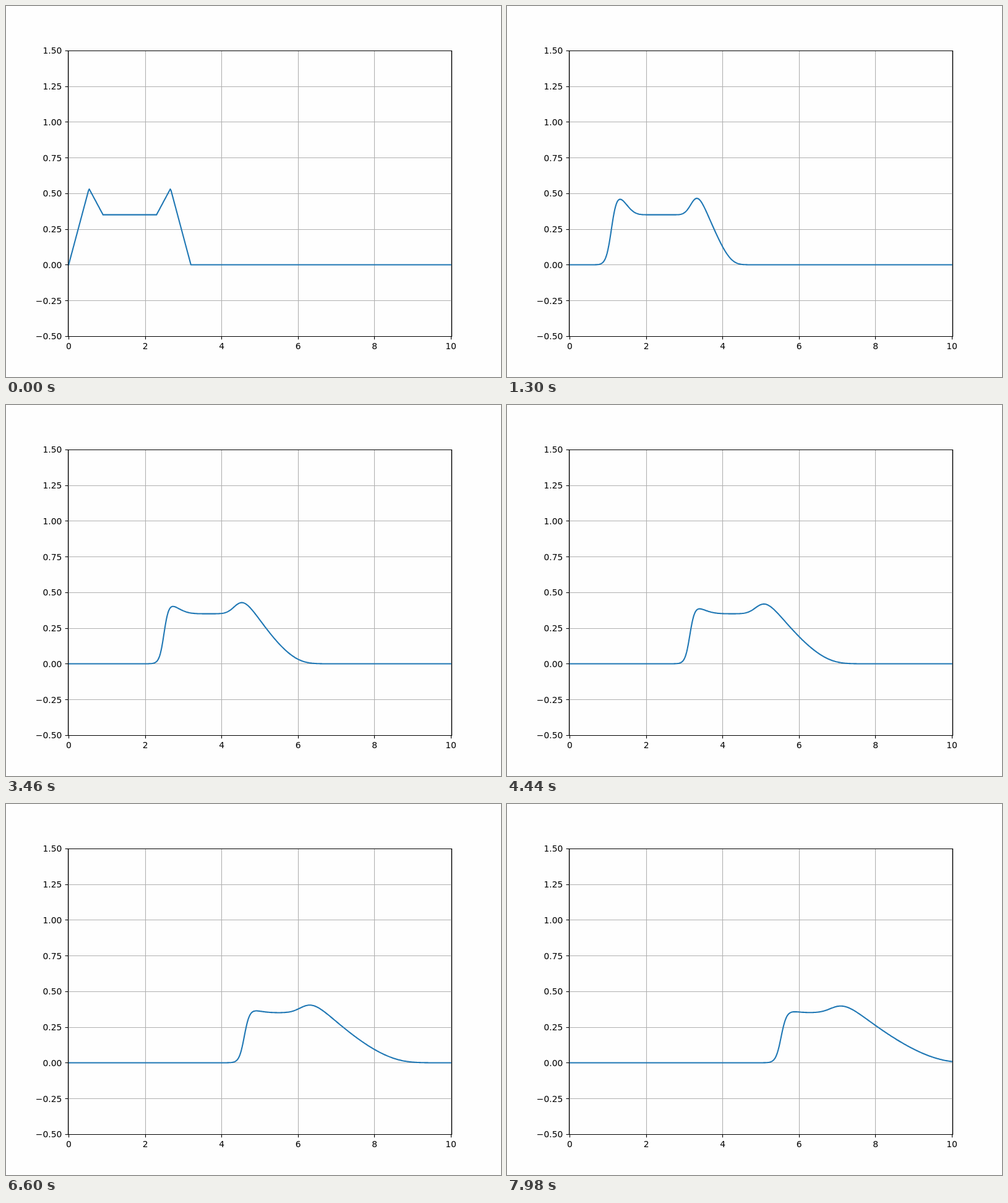
Animation, 800 px wide and 600 px high, one loop 8 s. Source, as an HTML page:

```html
<!DOCTYPE html>
<html lang="en">
<head>
<meta charset="utf-8">
<title>Travelling wave</title>
<style>
  html, body { margin: 0; width: 100%; height: 100%; overflow: hidden; background: #fefefe; }
  svg { display: block; width: 800px; height: 600px; }
  text { font: 13.89px "DejaVu Sans", sans-serif; }
  .line { stroke-width: 1.11; fill: none; }
  .grid { stroke: #b0b0b0; }
  .axis { stroke: #000; }
  #curve { fill: none; stroke: #1f77b4; stroke-width: 2.08; stroke-linejoin: round; stroke-linecap: square; }
</style>
</head>
<body>
<svg viewBox="0 0 800 600">
  <g id="grid"></g>
  <polyline id="curve"/>
  <g id="axes"></g>
</svg>
<script>
const STEP_MS = 20, STEPS = 400;
const DX = 0.02, CELLS = 501;
const SPEED = 0.802, SUBSTEPS = 4;
const BOX = { left: 100, right: 720, top: 72, bottom: 534 };

const px = x => BOX.left + (x + DX) * 620 / (10 + 2 * DX);
const py = y => BOX.top + (1.5 - y) * 231;
const snap = v => Math.floor(v + 0.5) + 0.5;

const gridLayer = document.getElementById('grid');
const axesLayer = document.getElementById('axes');
const curve = document.getElementById('curve');

function add(parent, tag, attrs, text = '') {
  const el = document.createElementNS('http://www.w3.org/2000/svg', tag);
  for (const name in attrs) el.setAttribute(name, attrs[name]);
  el.textContent = text;
  parent.appendChild(el);
}
const path = (parent, kind, d) => add(parent, 'path', { class: 'line ' + kind, d });

function drawAxes() {
  const { left, right, top, bottom } = BOX;
  for (let x = 0; x <= 10; x += 2) {
    const sx = snap(px(x));
    path(gridLayer, 'grid', `M${sx} ${top}V${bottom}`);
    path(axesLayer, 'axis', `M${sx} ${bottom + 0.5}v4.86`);
    add(axesLayer, 'text', { x: px(x) + 0.3, y: 555, 'text-anchor': 'middle' }, String(x));
  }
  for (let i = -2; i <= 6; i++) {
    const y = i / 4, sy = snap(py(y) - 0.01);
    path(gridLayer, 'grid', `M${left} ${sy}H${right}`);
    path(axesLayer, 'axis', `M${left + 0.5} ${sy}h-4.86`);
    const label = (y < 0 ? '\u2212' : '') + Math.abs(y).toFixed(2);
    add(axesLayer, 'text', { x: 90.3, y: Math.round(py(y) + 5.4), 'text-anchor': 'end' }, label);
  }
  path(axesLayer, 'axis', `M${left + 0.5} ${top + 0.5}H${right + 0.5}V${bottom + 0.5}H${left + 0.5}Z`);
}

// Two-horned starting profile, symmetric about x = 1.6
function startHeight(x) {
  const d = Math.abs(x - 1.6);
  return Math.max(0, Math.min(1.6 - d, Math.max(0.35, d / 2)));
}

// Implicit upwind step of u_t + (SPEED * ln(1 + u))_x = 0
function advance(u, dt) {
  const k = SPEED * dt / DX;
  let inflow = 0;
  u[0] = 0;
  for (let i = 1; i < CELLS; i++) {
    const rhs = u[i] + k * inflow;
    let v = u[i];
    for (let n = 0; n < 3; n++) {
      v -= (v + k * Math.log1p(v) - rhs) / (1 + k / (1 + v));
    }
    u[i] = v;
    inflow = Math.log1p(v);
  }
}

function simulate() {
  const u = Float64Array.from({ length: CELLS }, (_, i) => startHeight(i * DX));
  const states = [u.slice()];
  while (states.length < STEPS) {
    for (let s = 0; s < SUBSTEPS; s++) advance(u, STEP_MS / 1000 / SUBSTEPS);
    states.push(u.slice());
  }
  return states;
}

drawAxes();
const states = simulate();
let shown = -1;

function render(now) {
  const step = Math.floor(Math.max(0, now - start) / STEP_MS) % STEPS;
  if (step !== shown) {
    shown = step;
    curve.setAttribute('points',
      Array.from(states[step], (u, i) => px(i * DX).toFixed(2) + ',' + py(u).toFixed(2)).join(' '));
  }
  requestAnimationFrame(render);
}

const start = performance.now();
render(start);
</script>
</body>
</html>
```
